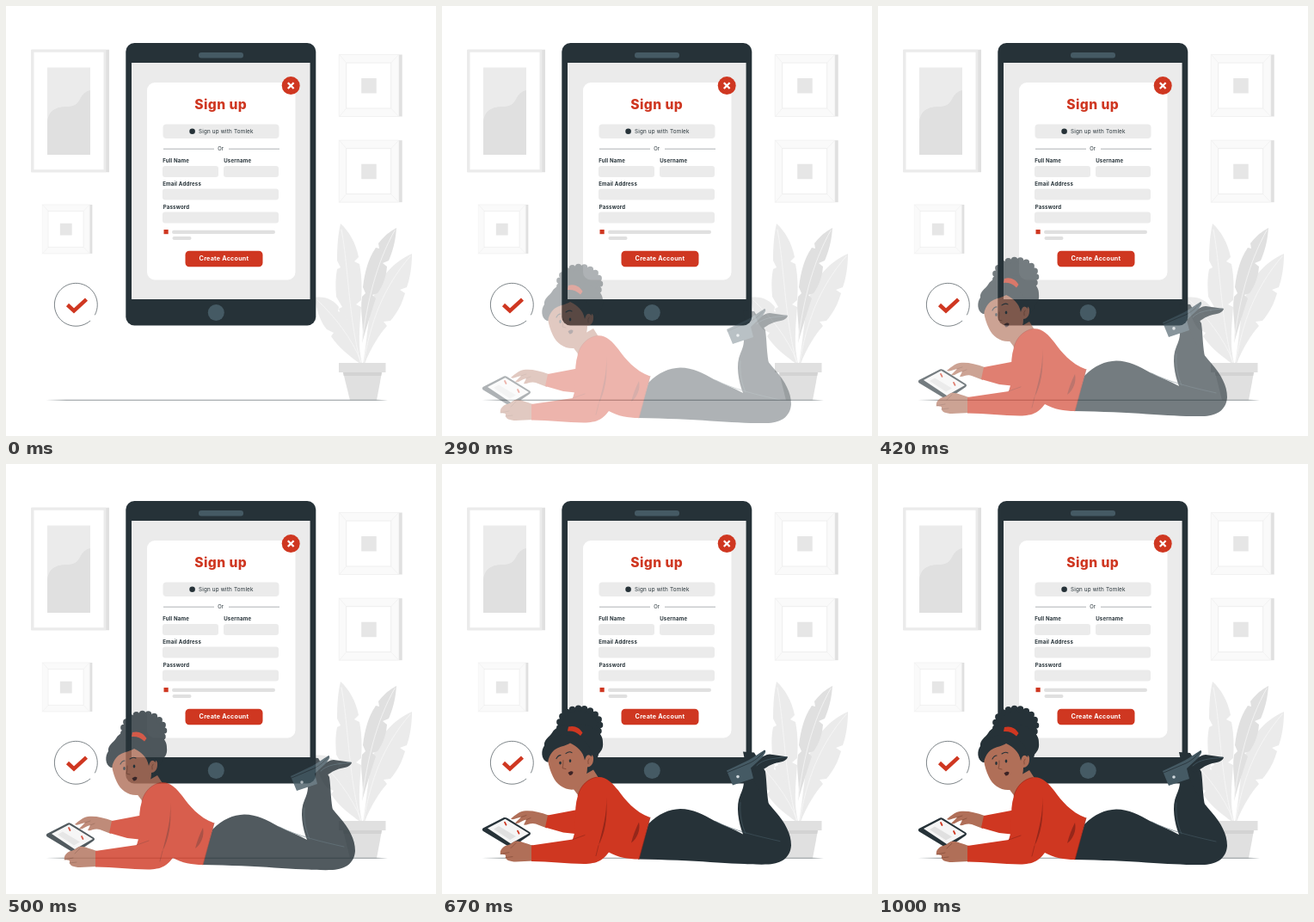
Write an HTML page that moves like this. It is 500 by 500 pixels and loops after 1.04 s.

```html
<!DOCTYPE html>
<html lang="en">
<head>
<meta charset="utf-8">
<title>Sign up</title>
<style>
  html, body { margin: 0; width: 100%; height: 100%; overflow: hidden; background: #fff; }
  svg { display: block; width: 100%; height: 100%; }
  text { font-family: Inter, "Open Sans", sans-serif; letter-spacing: .03em; fill: #263238; }
  .label { font-size: 6.1px; font-weight: 700; }
  .mid { text-anchor: middle; }
  .dark { fill: #263238; }
  .slate { fill: #455a64; }
  .red { fill: #cf3721; }
  .skin { fill: #b06f58; }
  .pale { fill: #ebebeb; }
  .gray { fill: #e0e0e0; }
  .white { fill: #fff; }
  .line { fill: none; stroke-linecap: round; stroke-linejoin: round; }
</style>
</head>
<body>
<svg viewBox="0 0 500 500">
  <defs>
    <g id="frame">
      <path class="gray" d="M69 0h4v72h-4z"/>
      <path d="M0 0h69v72H0z" fill="#fafafa"/>
      <path class="line" d="M0 0h69v72H0zl8 9.500M69 0l-9 9.500M0 72l8-9.500M69 72l-9-9.500" stroke="#f0f0f0" stroke-width=".8"/>
      <path d="M8 9.500h52v53H8z" fill="#fff" stroke="#ededed" stroke-width=".9"/>
      <path d="M25.500 27.500h17.500v17.500H25.500z" fill="#e6e6e6"/>
    </g>
  </defs>

  <!-- Wall -->
  <path class="gray" d="M29.400 50.700h90.600v142.600H29.400z"/>
  <path class="pale" d="M29.400 50.700h87v142.600h-87z"/>
  <path class="white" d="M32.500 53.700h81v136.600h-81z"/>
  <path class="pale" d="M48 71.500h50V173H48z"/>
  <path class="gray" d="M48 134C50 120 60 117 71 117C90 117 82 102 98 98V173H48z"/>
  <use href="#frame" x="387.700" y="56.500"/>
  <use href="#frame" x="387.700" y="156.200"/>
  <use href="#frame" transform="translate(42.700 231) scale(.79)"/>

  <!-- Plant -->
  <g class="pale">
    <path d="M411 416C405 396 393 374 387 352L391 350L384 338C383 326 383 316 385 306L389 304L385 296C385 280 386 266 389 253C399 262 407 276 410 292L405 297L411 300C414 315 414 330 413 342L407 347L413 350C411 374 409 395 414 416z"/>
    <path d="M415 416C419 394 420 376 424 352C428 326 444 300 472 288C472 302 470 316 466 327L458 330L464 334C460 348 454 358 447 366L439 367L443 372C434 382 424 398 417 416z"/>
    <path d="M412 416C402 409 386 397 378 384L381 380L373 376C366 368 361 354 359 339C371 337 381 342 387 350L386 355L392 357C402 372 409 394 413 416z"/>
    <path class="gray" d="M414 392C417 372 411 357 414 338L418 334L415 327C417 310 421 294 430 281L434 282L433 276C439 268 446 262 454 258C453 274 449 287 445 296L438 299L443 303C442 317 437 327 432 334L426 336L430 340C424 358 419 374 414 392z"/>
    <path class="line" d="M390 260C398 300 398 360 412 414M470 291C438 328 424 368 416 414M362 342C383 362 402 386 413 414M452 261C430 300 420 345 414 390" stroke="#fafafa" stroke-width=".7"/>
  </g>
  <path class="gray" d="M392 426h45l-6 32.500h-31z"/>
  <path d="M392 426h45l-.8 4h-43.500z" fill="#d3d3d3"/>
  <path class="gray" d="M387 415h54.500v11H387z"/>

  <!-- Tablet -->
  <rect class="dark" x="139.300" y="43" width="221" height="328.500" rx="10"/>
  <path class="pale" d="M146 66h207.600V341H146z"/>
  <rect class="slate" x="224" y="54" width="52" height="6.500" rx="3"/>
  <circle class="slate" cx="244.300" cy="356.500" r="9.500"/>
  <rect class="white" x="164" y="89" width="172.500" height="229.500" rx="9"/>
  <circle class="red" cx="331.200" cy="92.600" r="10.500"/>
  <path d="M327.800 89.200l6.800 6.800m0-6.800l-6.800 6.800" stroke="#fff" stroke-width="2.300"/>

  <!-- Form -->
  <text class="mid red" x="249.700" y="119.500" font-size="15.600" font-weight="800">Sign up</text>
  <g class="pale">
    <rect x="182.500" y="137.500" width="135" height="16.500" rx="4"/>
    <rect x="182" y="186" width="65" height="13" rx="3"/>
    <rect x="253" y="186" width="64" height="13" rx="3"/>
    <rect x="182" y="212.500" width="135" height="13" rx="3"/>
    <rect x="182" y="239.500" width="135" height="13" rx="3"/>
  </g>
  <circle class="dark" cx="216.600" cy="145.800" r="3.300"/>
  <text x="224" y="148" font-size="6.300">Sign up with Tomlek</text>
  <path d="M183 166.200h59m17 0h59" stroke="#8c9397" stroke-width=".7"/>
  <text class="mid" x="249.700" y="168" font-size="5.800">Or</text>
  <g class="label">
    <text x="182.200" y="181.600">Full Name</text>
    <text x="253.200" y="181.600">Username</text>
    <text x="182.200" y="209">Email Address</text>
    <text x="182.700" y="236">Password</text>
  </g>
  <path class="red" d="M183.500 260h5.200v5.200h-5.200z"/>
  <rect class="gray" x="193" y="260.800" width="120" height="4.200" rx="2.100"/>
  <rect class="gray" x="193.500" y="268" width="22" height="4" rx="2"/>
  <rect class="red" x="208.500" y="284.700" width="90" height="18.500" rx="4.500"/>
  <text class="mid white" x="253.500" y="296.300" font-size="7.200" font-weight="700">Create Account</text>

  <!-- Check badge -->
  <path class="line" d="M97.800 366.200A25 25 0 1 1 103.500 359" stroke="#263238" stroke-width=".6"/>
  <path d="M71.500 347.500l7.500 7l14.500-13.300" fill="none" stroke="#cf3721" stroke-width="4.500"/>

  <path d="M46 458L70 457.700H430L444 458.200L430 458.700H70z" fill="#90979a"/>

  <g id="girl" opacity="0">
    <!-- Legs -->
    <path class="dark" d="M350 335L363 336L376 358C378 372 377 384 381 402L362 392z"/>
    <path class="dark" d="M358 352C368 345 372 339 381 338L402 341C401 345 396 347 389 348C380 350 374 356 368 359z"/>
    <path class="line" d="M366 351C374 343 385 343 401 341" stroke="#455a64" stroke-width=".8"/>
    <path class="dark" d="M240 419C252 407 264 402 277 401.500C292 401.500 304 408 316 415C328 421 339 425 350 431C345 418 341 398 347 385C349 380 351 376 351 369L362 365C366 379 378 393 388 405C399 418 406 430 406 444C405 458 395 465 380 466C345 467 300 461 228 460z"/>
    <path class="line" d="M318 416C340 427 366 433 393 439M347 394C346 409 349 421 353 430" stroke="#455a64" stroke-width=".6"/>
    <path class="slate" d="M331 357L350 348C360 344 368 337 375 333C378 334 375 338 372 342L359 354L362 366L338 374z"/>
    <path class="line" d="M332 359L358 348C366 344 371 339 375 334" stroke="#263238" stroke-width=".8"/>
    <circle cx="344" cy="364" r="1.800" fill="#cfd8dc"/>

    <!-- Far arm and handheld tablet -->
    <path class="skin" d="M124 409C113 405 104 403 95 404C89 405 85 409 80 413C83 415 87 412 92 411L85 418C88 420 93 415 98 414L95 420C99 421 103 417 109 419L122 424z"/>
    <path class="line" d="M92 411l6-2M98 414l5-2" stroke="#7c4735" stroke-width=".6"/>
    <path class="red" d="M123 409L160 402V431L141 429L120 423z"/>
    <path class="dark" d="M47.500 424L72 411.500Q74 411 76 412.200L102 428.500Q104 430 102 432L83 445Q80 447 77 445L48 427.500Q46 426 47.500 424z"/>
    <path d="M53 424L73.500 413.200L101 430L80 442z" fill="#f5f5f5"/>
    <path d="M60 425L66 421.500L86 433.500L79 437.500z" fill="#e0e0e0"/>
    <path class="line" d="M73 417l1.500 3M88 427l1.500 3" stroke="#cf3721" stroke-width="1.800"/>
    <path class="skin" d="M106 444C98 442 91 438 85 439C82 440 79 444 75 444C70 446 67 450 68 454C71 455 74 454 74 456C73 461 79 463 86 463L106 462z"/>
    <path class="line" d="M68 454l10-2M74 458l8-1M86 441l-6 6" stroke="#7c4735" stroke-width=".6"/>

    <!-- Torso -->
    <path class="skin" d="M148 372L176 356L185 370L160 388z"/>
    <path class="red" d="M158 386C161 374 170 366 180 364.500C190 363 198 371 205 380C213 391 224 405 242 411.500L229 460C216 460 205 458 194 452C186 462 181 465 165 465.500C145 465 125 463 104 462.500L104 444L152 437C158 421 152 405 158 386z"/>
    <path d="M191 388C192 408 187 424 182 444C189 431 193 413 191 388zM229 417C225 425 222 433 220 441C227 436 231 426 229 417z" fill="#96271a"/>
    <path class="line" d="M242 411.500L229 460M152 437L166 432M182 444L179 456" stroke="#96271a" stroke-width=".7"/>
    <path class="line" d="M158 386C161 374 170 366 180 364.500" stroke="#96271a" stroke-width=".6"/>

    <!-- Head -->
    <ellipse class="dark" cx="160" cy="304" rx="23.500" ry="19.500" stroke="#263238" stroke-width="7.500" stroke-linecap="round" stroke-dasharray="0 7.100"/>
    <path class="dark" d="M122 347C115 344 115 333 119 328C118 321 125 318 128 313C132 306 140 304 148 304C164 298 188 309 187 324C188 332 184 335 182 338C181 345 175 347 168 347z"/>
    <path class="skin" d="M125 329C133 323 143 326 150 321C158 328 165 332 167 340C171 336 177 338 176 344C176 350 172 353 169 353C169 365 163 377 153 379C143 380 133 373 129 364C123 351 121 340 125 329z"/>
    <path class="dark" d="M118 342C116 328 126 318 140 315L160 318C168 323 175 332 174 341C170 337 168 338 166 345C164 334 157 329 149 325C140 331 128 327 123 347z"/>
    <path class="red" d="M147 306C154 304 160 307 163.500 313L161 316.500C156 312 152 310.500 146 311z"/>
    <path class="line" d="M133 343q2-4 5-4M144 337q4-3 7-1" stroke="#263238" stroke-width="1.100"/>
    <path class="line" d="M141 345q0 7-1 9l4 1M171 343q-2 2-1 6" stroke="#7c4735" stroke-width=".8"/>
    <ellipse class="dark" cx="137.500" cy="348" rx="1.300" ry="1.900"/>
    <ellipse class="dark" cx="149" cy="345.500" rx="1.300" ry="1.900"/>
    <path d="M146.500 359.500C149 357.500 151 357 152.500 358.500C152.500 361 150.500 362.500 148.500 362.500z" fill="#3c2325"/>
  </g>
</svg>
<script>
  const girl = document.getElementById("girl");
  const start = performance.now();
  const LOOP = 1040, FPS = 24, RISE = 30, LEAD = 0.03;

  const bezier = (a, b, s) => 3 * (1 - s) ** 2 * s * a + 3 * (1 - s) * s * s * b + s ** 3;

  // Ease with a small overshoot; bisect for the curve parameter.
  function ease(x) {
    let lo = 0, hi = 1;
    for (let i = 0; i < 24; i++) {
      const mid = (lo + hi) / 2;
      if (bezier(0.36, 0.5, mid) < x) lo = mid; else hi = mid;
    }
    return bezier(-0.01, 1.38, hi);
  }

  function draw() {
    const t = (performance.now() - start) % LOOP;
    const step = Math.floor((t + 4) * FPS / 1000);
    const p = step < 2 ? 0 : ease(Math.min(1, step / FPS + LEAD));
    girl.setAttribute("opacity", Math.max(0, Math.min(1, p)));
    girl.setAttribute("transform", `translate(0 ${RISE * (1 - p)})`);
    requestAnimationFrame(draw);
  }
  draw();
</script>
</body>
</html>
```
